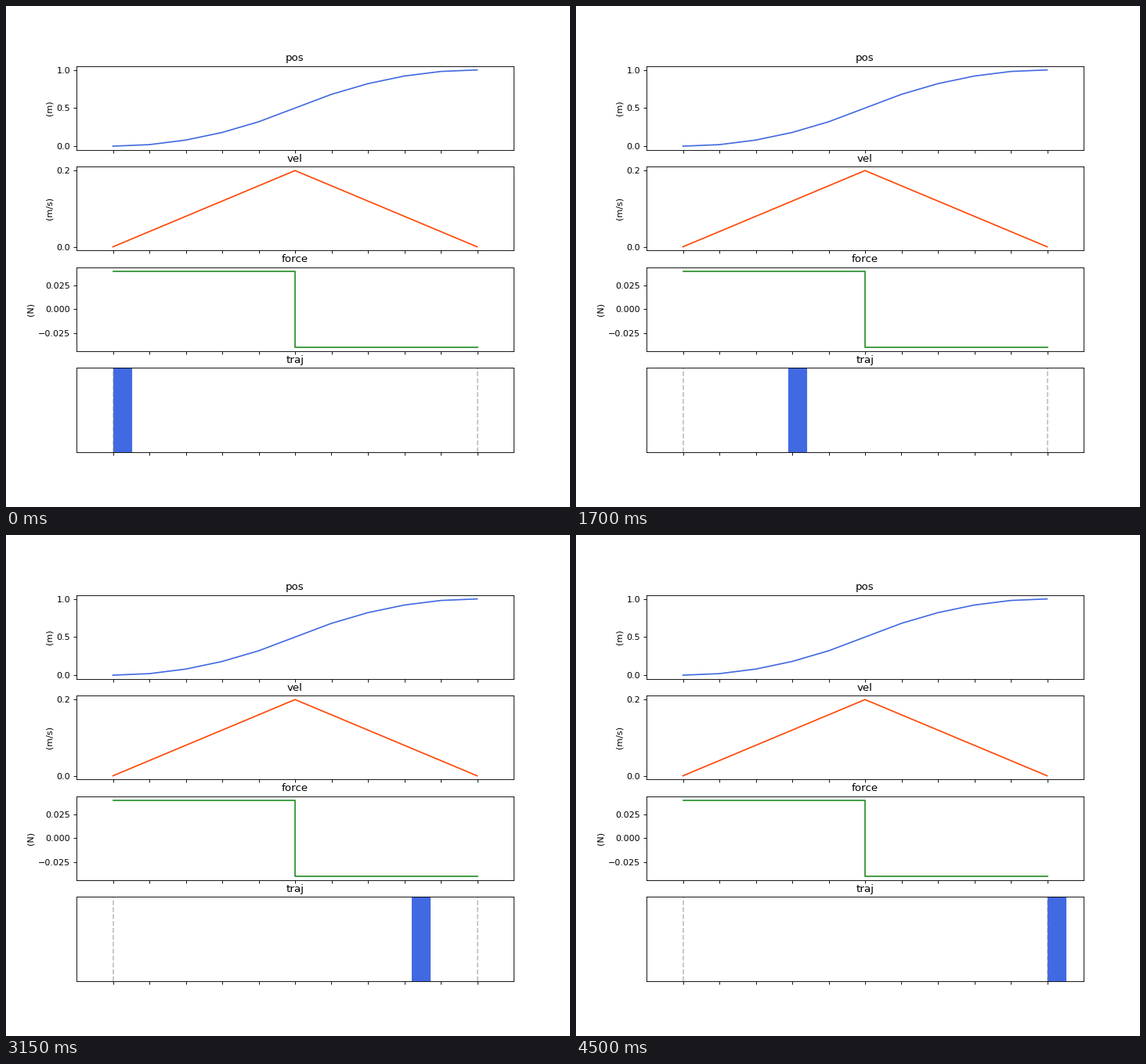
These frames come from a looping animation (720 by 640 pixels, 5000 ms). A matplotlib script:

```python
import numpy as np
import matplotlib.pyplot as plt
from matplotlib.animation import FuncAnimation
from matplotlib.patches import Rectangle

FRAMES, INTERVAL = 100, 50
MOVE_FRAMES = 90  # the block rests at the goal afterwards
STEPS = 10
ACCEL = 0.04

# Bang-bang control: accelerate for half the time, then brake.
t = np.arange(STEPS + 1)
force = np.where(t < STEPS / 2, ACCEL, -ACCEL)
vel = ACCEL * np.minimum(t, STEPS - t)
pos = np.where(t <= STEPS / 2, ACCEL / 2 * t**2, 1 - ACCEL / 2 * (STEPS - t)**2)

fig, axes = plt.subplots(4, 1, figsize=(9, 8), dpi=80)


def plot_panel(ax, title, unit, values, color, yticks, **style):
    ax.plot(t, values, color=color, **style)
    ax.set_title(title)
    ax.set_ylabel(unit)
    ax.set_xlim(-1, STEPS + 1)
    ax.set_xticks(t, labels=[])
    ax.set_yticks(yticks)


plot_panel(axes[0], "pos", "(m)", pos, "royalblue", [0, 0.5, 1])
plot_panel(axes[1], "vel", "(m/s)", vel, "orangered", [0, 0.2])
plot_panel(axes[2], "force", "(N)", force, "forestgreen",
           [-0.025, 0, 0.025], drawstyle="steps-post")

track = axes[3]
track.set_title("traj")
track.set_xlim(-0.1, 1.1)
track.set_ylim(0, 1)
track.set_xticks(t / STEPS, labels=[])
track.set_yticks([])
for x in (0, 1):
    track.axvline(x, color="gray", linestyle="--", alpha=0.5)
block = track.add_patch(Rectangle((0, 0), 0.05, 1, color="royalblue"))


def update(frame):
    time = STEPS * min(frame, MOVE_FRAMES) / MOVE_FRAMES
    block.set_x(np.interp(time, t, pos))
    return (block,)


anim = FuncAnimation(fig, update, frames=FRAMES, interval=INTERVAL,
                     repeat=True, repeat_delay=0)
plt.show()
```
